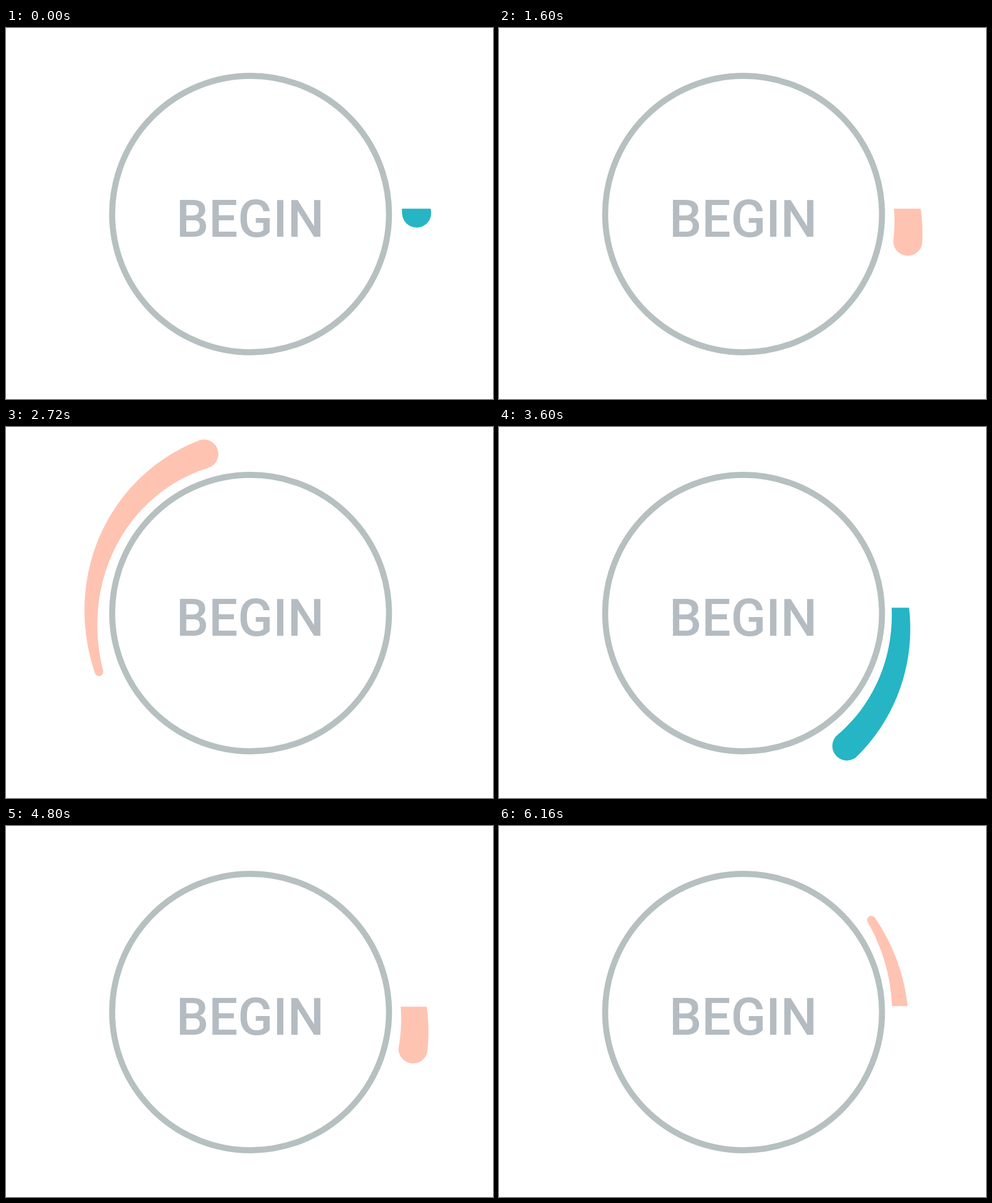
Write an HTML page that moves like this. It is 857 px wide and 654 px high and loops after 6240 ms.

```html
<!DOCTYPE html>
<html lang="en">
<head>
<meta charset="utf-8">
<title>Begin</title>
<style>
  html, body { margin: 0; width: 100%; height: 100%; overflow: hidden; background: #fff; }
  svg { display: block; width: 857px; height: 654px; }
  text { font: 500 90.7px Roboto, sans-serif; fill: #b4bcc2; text-anchor: middle; }
</style>
</head>
<body>
<svg viewBox="0 0 857 654">
  <defs>
    <clipPath id="below"><rect y="318.5" width="857" height="336"/></clipPath>
    <clipPath id="above"><rect width="857" height="317.5"/></clipPath>
  </defs>
  <circle cx="430.4" cy="328" r="243.6" fill="none" stroke="#b6c0c0" stroke-width="10.6"/>
  <text x="429.7" y="368">BEGIN</text>
  <path id="comet"/>
</svg>
<script>
const LOOP = 6240, STEP = 80;
const CX = 427.5, CY = 332, SPAN = 95.1;
const HEAD_RADIUS = 25.6, TAIL_RADIUS = 7.5;
const TEAL = '#26b5c4', PINK = '#ffc3b2';
const sweeps = [[0, TEAL], [1503, PINK], [3165, TEAL], [4675, PINK], [LOOP, TEAL]];

// Accelerating sweep: [ms since start, head angle in degrees]
const keys = [[0, -1.1], [97, 8.6], [417, 48.6], [670, 92.7], [960, 162.5],
              [1157, 230], [1280, 286], [1485, 419], [1570, 480]];
const comet = document.getElementById('comet');

function slope(i) {
  const a = keys[Math.max(i - 1, 0)], b = keys[Math.min(i + 1, keys.length - 1)];
  return (b[1] - a[1]) / (b[0] - a[0]);
}

function headAngle(ms) {
  if (ms <= 0) return keys[0][1] + slope(0) * ms;
  const i = keys.findIndex(k => k[0] > ms) - 1;
  if (i < 0) return Infinity;
  const [t0, a0] = keys[i], [t1, a1] = keys[i + 1];
  const d = t1 - t0, u = (ms - t0) / d, v = 1 - u;
  return a0 * v * v * (1 + 2 * u) + a1 * u * u * (3 - 2 * u)
       + d * u * v * (v * slope(i) - u * slope(i + 1));
}

function polar(degrees, radius) {
  const a = degrees * Math.PI / 180;
  return (CX + radius * Math.cos(a)).toFixed(2) + ' ' + (CY + radius * Math.sin(a)).toFixed(2);
}

const spineRadius = u => 295.2 - 32 * u - 10 * u * u + 28.8 * u ** 3;
const halfWidth = u => HEAD_RADIUS + (TAIL_RADIUS - HEAD_RADIUS) * u;

function cometPath(head) {
  const outer = [], inner = [];
  for (let i = 0; i <= 48; i++) {
    const u = i / 48, angle = head - SPAN * u;
    outer.push(polar(angle, spineRadius(u) + halfWidth(u)));
    inner.unshift(polar(angle, spineRadius(u) - halfWidth(u)));
  }
  const cap = (r, point) => `A${r} ${r} 0 0 0 ${point}`;
  return 'M' + outer.join('L') + cap(TAIL_RADIUS, inner[0])
       + 'L' + inner.join('L') + cap(HEAD_RADIUS, outer[0]) + 'Z';
}

function draw(time) {
  const t = Math.floor((time + 20) / STEP) * STEP % LOOP;
  const active = sweeps.find(([start]) => {
    const angle = headAngle(t - start);
    return angle > -8 && angle < 455;
  });
  if (!active) {
    comet.setAttribute('d', '');
    return;
  }
  const head = headAngle(t - active[0]);
  comet.setAttribute('d', cometPath(head));
  comet.setAttribute('fill', active[1]);
  comet.setAttribute('clip-path', head < 130 ? 'url(#below)' : head > 300 ? 'url(#above)' : 'none');
}

const began = performance.now();
function tick() {
  draw(performance.now() - began);
  requestAnimationFrame(tick);
}
tick();
</script>
</body>
</html>
```
